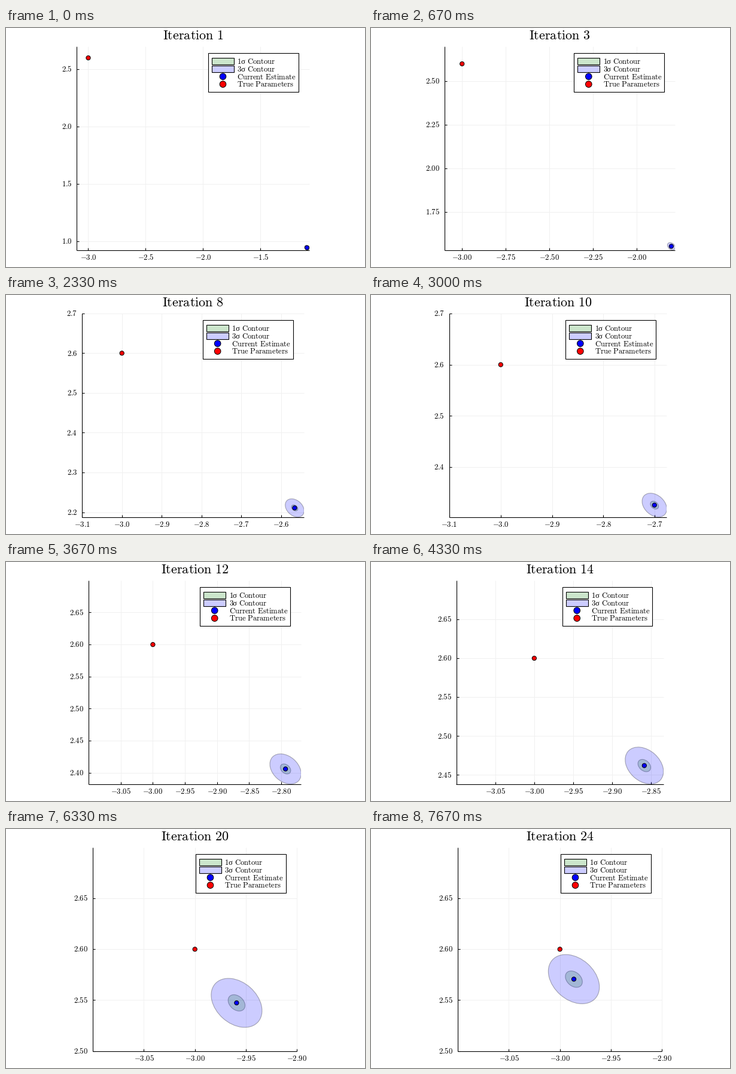
Write a matplotlib script that moves like this. It is 600 by 400 pixels and loops after 8000 ms.

```python
import math

import numpy as np
import matplotlib.pyplot as plt
from matplotlib.animation import FuncAnimation
from matplotlib.patches import Circle, Ellipse, Rectangle

plt.rcParams["mathtext.fontset"] = "cm"

DPI, PX = 100, 0.72          # PX: points per pixel
FRAMES, INTERVAL = 24, 333   # three iterations per second, in whole milliseconds
TOP, BOTTOM = 30.8, 371.6
TRUE_X, TRUE_Y = -3.0, 2.6
MARGIN = 0.1
X_MIN, Y_MAX = TRUE_X - MARGIN, TRUE_Y + MARGIN
SMALL, LARGE = 12.7, 22.1    # font sizes in pixels

# Remaining distance to the limit point at a few iterations; it decays geometrically
KEYS = [1, 2, 3, 4, 5, 6, 8, 10, 14, 17, 20, 24]
GAP_X = [1.9175, 1.515, 1.212, 0.978, 0.797, 0.6518, 0.4474, 0.313, 0.1547, 0.0918, 0.0544, 0.0272]
GAP_Y = [1.648, 1.300, 1.040, 0.838, 0.682, 0.5577, 0.3826, 0.2674, 0.1313, 0.0778, 0.0461, 0.0228]
LIMIT_X, LIMIT_Y = -3.0135, 2.5934

fig = plt.figure(figsize=(6, 4), dpi=DPI, facecolor="white")
ax = fig.add_axes([0, 0, 1, 1])


def estimate(k):
    gap_x = math.exp(np.interp(k, KEYS, np.log(GAP_X)))
    gap_y = math.exp(np.interp(k, KEYS, np.log(GAP_Y)))
    return LIMIT_X + gap_x, LIMIT_Y - gap_y


def contour_extent(k):
    half_width = 0.0252 - 0.004 * math.exp(-(k - 1) / 7)
    return half_width, 0.965 * half_width


def pick_ticks(lo, hi):
    """Best scoring set of 4 to 8 round values, with the decimals to print."""
    best = (-1, [], 1)
    for scale in (0.01, 0.1, 1):
        for q, nice in ((1, 1), (5, 0.9), (2, 0.7), (2.5, 0.5), (3, 0.2)):
            step = q * scale
            first, last = math.ceil(lo / step - 1e-6), math.floor(hi / step + 1e-6)
            if last - first > 10:
                continue
            ticks = [n * step for n in range(first, last + 1)]
            if step < 0.099:
                ticks = [t for t in ticks if min(abs(t - X_MIN), abs(t - Y_MAX)) > 1e-6]
            if not 4 <= len(ticks) <= 8:
                continue
            count_score = 1 - abs(len(ticks) - 5) / 5
            cover = 1.5 * (hi - lo) / (ticks[-1] - ticks[0])
            score = count_score / 4 + cover / 3 + nice / 4
            if score > best[0]:
                decimals = 1 if abs(step * 10 - round(step * 10)) < 1e-6 else 2
                best = (score, ticks, decimals)
    return best[1:]


def line(x0, y0, x1, y1, color="black", width=1.1, z=1):
    ax.plot([x0, x1], [y0, y1], color=color, lw=width * PX, zorder=z,
            solid_capstyle="butt")


def text(x, y, s, size=SMALL, ha="left"):
    roman = r"$\mathrm{%s}$" % s.replace(" ", r"\ ")
    ax.text(x, y, roman, fontsize=size * PX, ha=ha, va="baseline", zorder=10)


def number(x, y, value, decimals, ha):
    ax.text(x, y, f"${value:.{decimals}f}$", fontsize=SMALL * PX, ha=ha,
            va="baseline", zorder=10)


def dot(x, y, color, radius, z):
    ax.add_patch(Circle((x, y), radius, fc=color, ec="black", lw=PX, zorder=z))


def box(x, y, w, h, color, z=7):
    ax.add_patch(Rectangle((x, y), w, h, fc=color, ec="black", lw=1.1 * PX, zorder=z))


def draw_contour(x, y, half_w, half_h, fill, clip, z):
    cov = -0.32 * half_w * half_h
    values, vectors = np.linalg.eigh([[half_w ** 2, -cov], [-cov, half_h ** 2]])
    angle = math.degrees(math.atan2(vectors[1, 1], vectors[0, 1]))
    size = 2 * np.sqrt(values[::-1])
    for style in (dict(fc=fill, ec="none", alpha=0.2),
                  dict(fc="none", ec="black", alpha=0.3, lw=1.1 * PX)):
        shape = Ellipse((x, y), *size, angle=angle, zorder=z, **style)
        ax.add_patch(shape)
        shape.set_clip_path(clip)


def draw_legend(right):
    box(right - 168.9, 42, 150.4, 65, "white", 6)
    left = right - 120.8
    for label, color, y in (("1", "#cce6cc", 55.4), ("3", "#ccccff", 68.3)):
        box(right - 163, y - 5.3, 36.8, 10.6, color)
        text(left, y + 4.3, label)
        ax.text(left + 6.3, y + 4.3, "σ", family="Liberation Serif",
                fontsize=SMALL * PX, va="baseline", zorder=10)
        text(left + 16.8, y + 4.3, "Contour")
    for label, color, y in (("Current Estimate", "blue", 81.2),
                            ("True Parameters", "red", 94.1)):
        dot(right - 144.6, y, color, 5.3, 8)
        text(left, y + 4.3, label)


def draw(frame):
    k = frame + 1
    ax.clear()
    ax.set(xlim=(0, 600), ylim=(400, 0))
    ax.axis("off")

    est_x, est_y = estimate(k)
    half_w, half_h = contour_extent(k)
    x_max = max(TRUE_X + MARGIN, est_x + half_w)
    y_min = min(TRUE_Y - MARGIN, est_y - half_h)
    x_ticks, x_decimals = pick_ticks(X_MIN, x_max)
    y_ticks, y_decimals = pick_ticks(y_min, Y_MAX)

    # Equal aspect: height is fixed, wider tick labels push the plot right
    scale = (BOTTOM - TOP) / (Y_MAX - y_min)
    width = scale * (x_max - X_MIN)
    center = 312.7 if y_decimals == 1 else 315.7
    left, right = center - width / 2, center + width / 2

    def px(x):
        return left + (x - X_MIN) * scale

    def py(y):
        return TOP + (Y_MAX - y) * scale

    for t in x_ticks:
        line(px(t), TOP, px(t), BOTTOM, "#f0f0f0", 1, 0)
        line(px(t), BOTTOM, px(t), BOTTOM - 4)
        number(px(t), 387.6, t, x_decimals, "center")
    for t in y_ticks:
        line(left, py(t), right, py(t), "#f0f0f0", 1, 0)
        line(left, py(t), left + 4, py(t))
        number(left - 8, py(t) + 4.2, t, y_decimals, "right")
    line(left, TOP, left, BOTTOM + 0.5)
    line(left - 0.5, BOTTOM, right, BOTTOM)

    clip = Rectangle((left, TOP), width, BOTTOM - TOP, transform=ax.transData)
    center_px = px(est_x), py(est_y)
    draw_contour(*center_px, half_w * scale / 3, half_h * scale / 3, "green", clip, 2)
    draw_contour(*center_px, half_w * scale, half_h * scale, "blue", clip, 3)
    dot(*center_px, "blue", 3.6, 4)
    dot(px(TRUE_X), py(TRUE_Y), "red", 3.6, 5)

    draw_legend(right)
    text(center, 18.6, f"Iteration {k}", LARGE, "center")
    return []


anim = FuncAnimation(fig, draw, frames=FRAMES, interval=INTERVAL,
                     init_func=lambda: [], repeat=True, repeat_delay=0)
plt.show()
```
